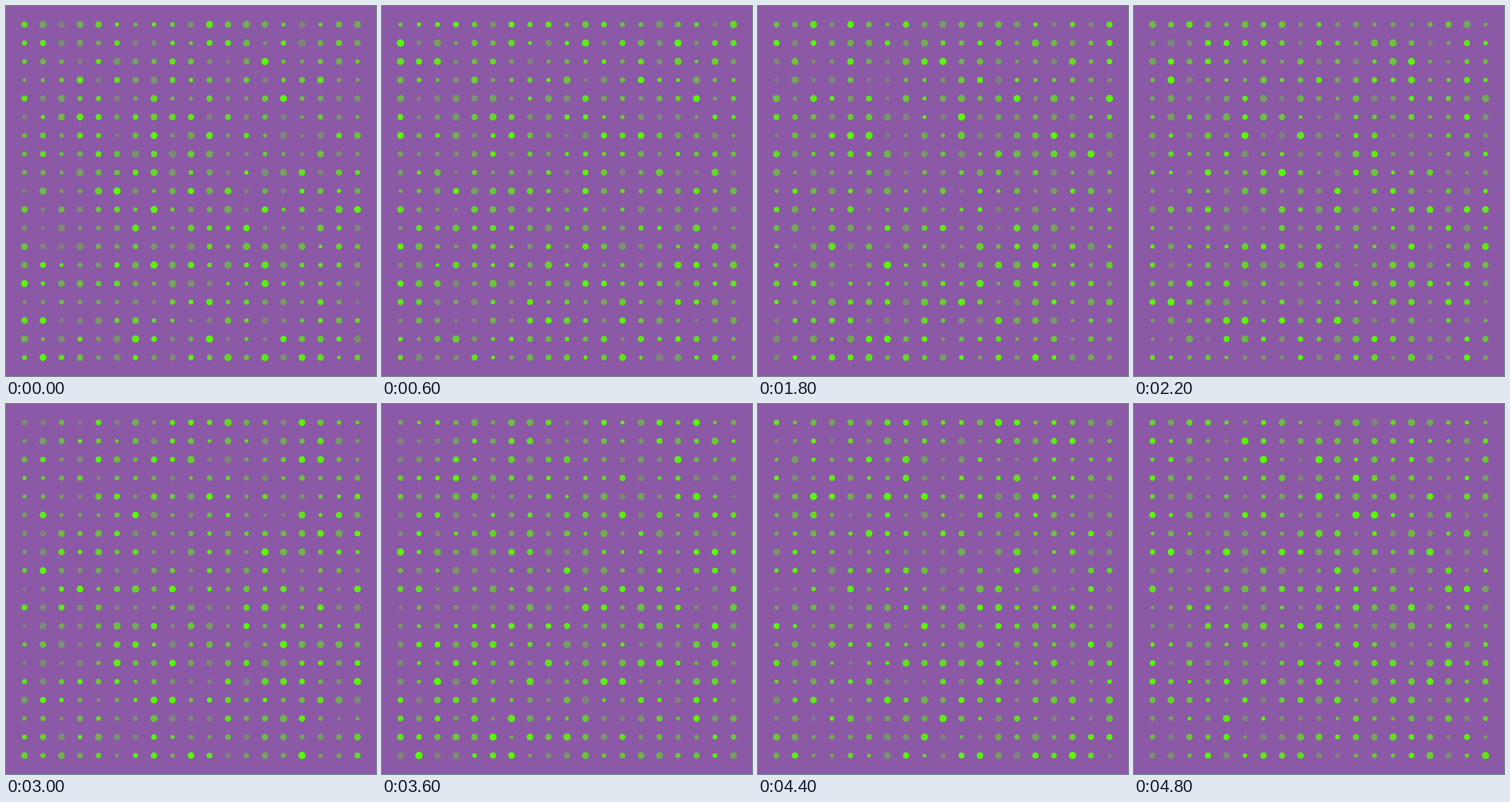
Recreate the animation shown at these times as an HTML page with a canvas. Size 500 by 500 pixels, loop 5 s.

```html
<!DOCTYPE html>
<html lang="en">
<head>
<meta charset="utf-8">
<title>Flickering dots</title>
<style>
  html, body { margin: 0; width: 100%; height: 100%; overflow: hidden; background: hsl(280 30% 50%); }
  canvas { display: block; }
</style>
</head>
<body>
<canvas id="stage" width="500" height="500"></canvas>
<script>
const ctx = document.getElementById('stage').getContext('2d');
const LOOP = 5000, STEP = 200;
const GAP = 25, COUNT = 19;
const R_MIN = 2.5, R_MAX = 5;

// Seeded generator (mulberry32)
function randomFrom(seed) {
  return () => {
    seed = (seed + 0x6D2B79F5) | 0;
    let t = Math.imul(seed ^ (seed >>> 15), 1 | seed);
    t = (t + Math.imul(t ^ (t >>> 7), 61 | t)) ^ t;
    return ((t ^ (t >>> 14)) >>> 0) / 4294967296;
  };
}

function draw(step) {
  const random = randomFrom((step + 1) * 7919);
  ctx.fillStyle = 'hsl(280, 30%, 50%)';
  ctx.fillRect(0, 0, 500, 500);
  for (let col = 1; col <= COUNT; col++) {
    for (let row = 1; row <= COUNT; row++) {
      const radius = R_MIN + random() * (R_MAX - R_MIN);
      ctx.fillStyle = `hsl(100, ${random() * 100}%, 50%)`;
      ctx.beginPath();
      ctx.arc(col * GAP, row * GAP, radius, 0, Math.PI * 2);
      ctx.fill();
    }
  }
}

const start = performance.now();
let shown = -1;
function tick() {
  const time = (performance.now() - start) % LOOP;
  const step = Math.floor(time / STEP);
  if (step !== shown) draw(shown = step);
  requestAnimationFrame(tick);
}
tick();
</script>
</body>
</html>
```
